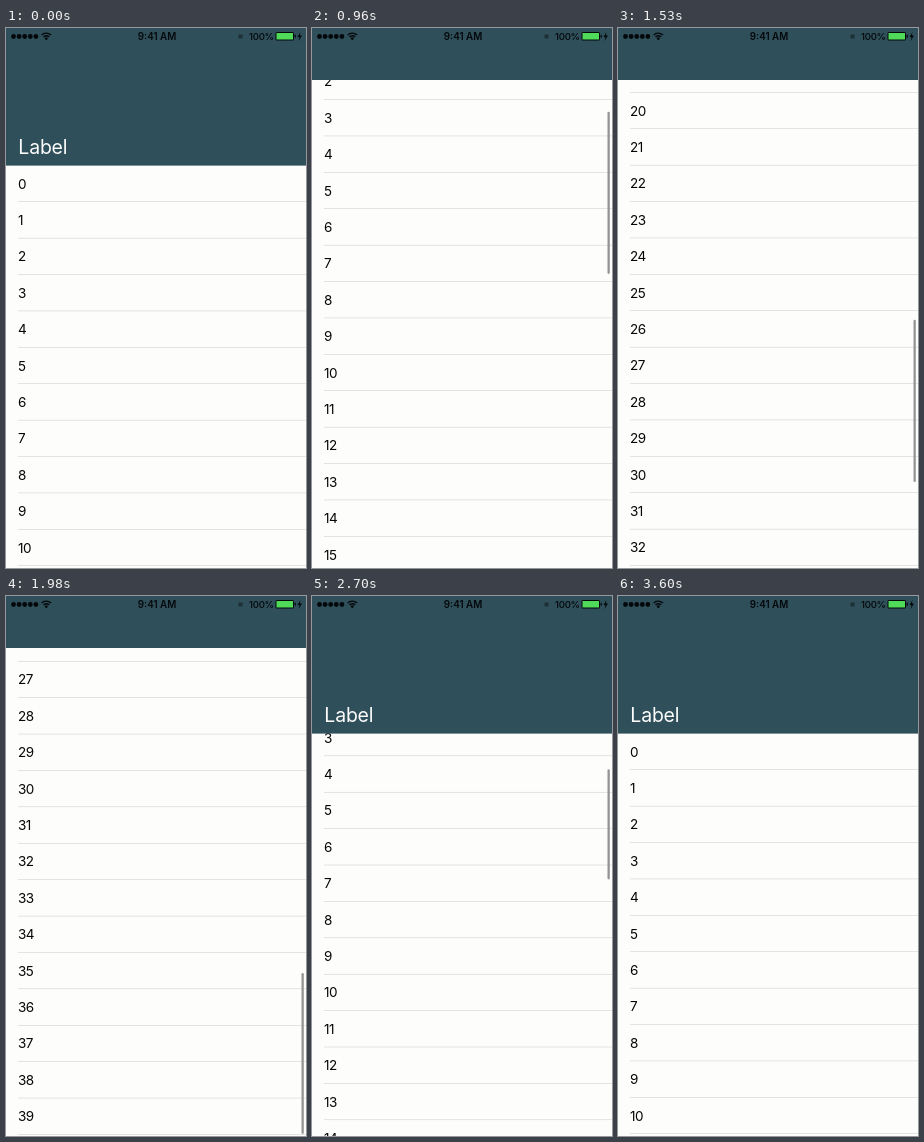
Write an HTML page with a canvas that moves like this. It is 300x540 px and loops after 3630 ms.

```html
<!DOCTYPE html>
<html lang="en">
<head>
<meta charset="utf-8">
<title>Collapsing header</title>
<style>
  html, body { margin: 0; width: 100%; height: 100%; overflow: hidden; background: #fdfdfc; }
  canvas { display: block; }
</style>
</head>
<body>
<canvas id="stage" width="300" height="540"></canvas>
<script>
const ctx = document.getElementById('stage').getContext('2d');
const W = 300, H = 540, LOOP = 3630, STEP = 30;
const ROW = 36.4, ROWS = 40, CONTENT = ROW * ROWS;
const OPEN = 137.6, CLOSED = 52, FOLD = OPEN - CLOSED;
const MAX_OFFSET = CONTENT - (H - CLOSED);
const TRAVEL = MAX_OFFSET + FOLD;
const FONT = 'Inter, Roboto, sans-serif';

// [time, distance] of the two swipes
const DOWN = [[90, 0], [600, 70], [960, 175], [1200, 420], [1530, 801], [1740, TRAVEL]];
const UP = [[1995, TRAVEL], [2250, 975], [2430, 827.5], [2560, 540], [2740, 0]];

const clamp = (v, lo, hi) => Math.min(hi, Math.max(lo, v));

// Monotone cubic interpolation
function curve(keys, t) {
  const last = keys.length - 1;
  if (t <= keys[0][0]) return keys[0][1];
  const slope = i => (keys[i + 1][1] - keys[i][1]) / (keys[i + 1][0] - keys[i][0]);
  const tangent = i => {
    if (i === 0) return 0;
    if (i === last) return slope(last - 1);
    const a = slope(i - 1), b = slope(i);
    return 2 * a * b / (a + b);
  };
  let i = 0;
  while (i < last - 1 && t > keys[i + 1][0]) i++;
  const [t0, y0] = keys[i], [t1, y1] = keys[i + 1];
  const h = t1 - t0, u = (t - t0) / h, v = 1 - u;
  return v * v * (1 + 2 * u) * y0 + u * u * (3 - 2 * u) * y1
    + h * u * v * (v * tangent(i) - u * tangent(i + 1));
}

const bounce = (t, speed) => speed * t * Math.exp(-t / 46);

function distance(t) {
  if (t < 1740) return curve(DOWN, t);
  if (t < 1995) return TRAVEL + bounce(t - 1740, 1);
  if (t < 2740) return curve(UP, t);
  return -bounce(t - 2740, 2.1);
}

// The header folds first on the way down and unfolds first on the way up
function scrollState(t) {
  const d = distance(t);
  return t < 1995
    ? { header: OPEN - clamp(d, 0, FOLD), offset: Math.max(0, d - FOLD) }
    : { header: CLOSED + clamp(TRAVEL - d, 0, FOLD), offset: Math.min(MAX_OFFSET, d) };
}

function text(str, x, y, size, color, weight = 400, align = 'left', spacing = 0) {
  ctx.font = `${weight} ${size}px ${FONT}`;
  ctx.letterSpacing = `${spacing}px`;
  ctx.fillStyle = color;
  ctx.textAlign = align;
  ctx.fillText(str, x, y);
}

function shape(color, build) {
  ctx.fillStyle = color;
  ctx.beginPath();
  build();
  ctx.fill();
}

function drawRows(header, offset) {
  for (let i = 0; i < ROWS; i++) {
    const top = header + i * ROW - offset;
    if (top + ROW < header - 1 || top > H) continue;
    text(i, 12, top + ROW / 2 + 4.8, 13.5, '#060606', 400, 'left', -0.6);
    ctx.fillStyle = '#c8c7cc';
    ctx.fillRect(12, top + ROW - 0.5, W - 12, 0.5);
  }
}

function drawScrollBar(header, offset, alpha) {
  const view = H - header, track = view - 4;
  const over = Math.max(0, -offset, offset - (CONTENT - view));
  const length = track * view / CONTENT - over;
  const y = offset > CONTENT - view
    ? H - 2 - length
    : header + 2 + Math.max(0, offset) / CONTENT * track;
  ctx.globalAlpha = alpha;
  shape('#949494', () => ctx.roundRect(295.5, y, 2.3, length, 1.15));
  ctx.globalAlpha = 1;
}

function drawHeader(height) {
  ctx.fillStyle = '#2f4f5a';
  ctx.fillRect(0, 0, W, height);
  ctx.globalAlpha = (height - CLOSED) / FOLD;
  text('Label', 12.3, height - 11.3, 19.5, '#fdfdfc', 400, 'left', -0.2);
  ctx.globalAlpha = 1;
}

function drawStatusBar() {
  const ink = '#04080a';
  for (let i = 0; i < 5; i++) shape(ink, () => ctx.arc(7.5 + i * 5.6, 8.5, 2.4, 0, 7));
  ctx.strokeStyle = ink;
  ctx.lineWidth = 1.4;
  for (const r of [3.8, 6.4]) {
    ctx.beginPath();
    ctx.arc(40.3, 11.5, r, -Math.PI * 0.76, -Math.PI * 0.24);
    ctx.stroke();
  }
  shape(ink, () => ctx.arc(40.3, 10.6, 1.4, 0, 7));
  text('9:41 AM', 151, 12, 9.8, ink, 600, 'center');
  shape('#1e2f36', () => ctx.rect(232.5, 6.5, 4, 4));
  text('100%', 243, 12, 9.6, ink, 500, 'left', -0.25);
  shape(ink, () => ctx.roundRect(269.5, 4, 18.5, 8.5, 1.5));
  shape('#50da5a', () => ctx.rect(270.5, 5, 16.5, 6.5));
  shape(ink, () => ctx.rect(288.6, 6.8, 1.2, 3));
  shape(ink, () => {
    ctx.moveTo(294.5, 4);
    ctx.lineTo(291.5, 9);
    ctx.lineTo(293.5, 9);
    ctx.lineTo(292.6, 13);
    ctx.lineTo(296, 7.5);
    ctx.lineTo(293.8, 7.5);
  });
}

function draw(now) {
  const time = Math.floor((now % LOOP) / STEP) * STEP;
  const { header, offset } = scrollState(time);
  ctx.fillStyle = '#fdfdfc';
  ctx.fillRect(0, 0, W, H);
  drawRows(header, offset);
  drawScrollBar(header, offset, clamp((time - 90) / 120, 0, 1) * clamp((3400 - time) / 220, 0, 1));
  drawHeader(header);
  drawStatusBar();
}

let start;
function frame(now) {
  start ??= now;
  draw(now - start);
  requestAnimationFrame(frame);
}
requestAnimationFrame(frame);
</script>
</body>
</html>
```
